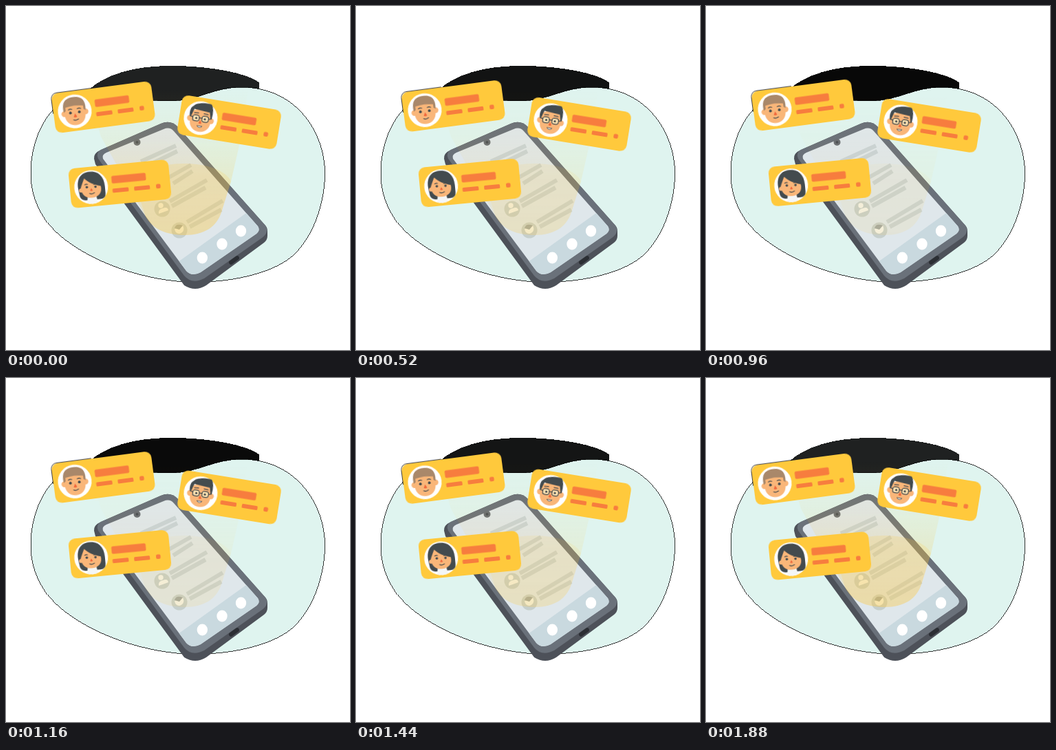
An HTML page for the animation above (1920 ms loop, 500 px wide and 500 px high).

```html
<!DOCTYPE html>
<html lang="en">
<head>
<meta charset="utf-8">
<title>Contact cards over a phone</title>
<style>
html, body { margin: 0; width: 100%; height: 100%; overflow: hidden; background: #fff; }
svg { display: block; width: 100vw; height: 100vh; }

.bob, .beam, .shade { animation: bob 1920ms cubic-bezier(.4, 0, .6, 1) infinite; }
.beam { animation-name: glow; }
.shade { animation-name: dim; }
@keyframes bob { 50% { transform: translateY(var(--rise)); } }
@keyframes glow { 50% { opacity: .28; } }
@keyframes dim { 0%, 100% { fill: #1f2121; } 50% { fill: #080808; } }

.dark { fill: #434b4e; }
.skin { fill: #f9b679; }
.nose { fill: #f0663a; }
.line { fill: none; stroke: #434b4e; stroke-width: 1.2; stroke-linecap: round; }
.rows { stroke: #c9d3d6; stroke-width: 6; }
.crisp { shape-rendering: crispEdges; }
</style>
</head>
<body>
<svg viewBox="0 0 500 500">
  <defs>
    <linearGradient id="ray" gradientUnits="userSpaceOnUse" x1="0" y1="120" x2="0" y2="333">
      <stop offset="0" stop-color="#ffc93c" stop-opacity="0"/>
      <stop offset=".35" stop-color="#ffc93c" stop-opacity=".08"/>
      <stop offset=".6" stop-color="#ffc93c" stop-opacity=".18"/>
      <stop offset="1" stop-color="#ffc93c" stop-opacity=".24"/>
    </linearGradient>
    <clipPath id="glass">
      <path id="screen" d="M141 222Q139 216 146 213L229 179Q238 175 244 182L366 320Q370 326 364 331L283 387Q270 394 262 385Z"/>
    </clipPath>
    <g id="card">
      <rect x="-73" y="-29" width="146" height="58" rx="9.5" fill="#ffc93c"/>
      <g fill="#f77d3e">
        <rect x="-11.5" y="-12.5" width="50" height="11" rx="2"/>
        <rect x="-11.5" y="6" width="23.5" height="6" rx="1.5"/>
        <rect x="20" y="6" width="23" height="6" rx="1.5"/>
        <rect x="52" y="5.5" width="6.5" height="6.5" rx="2"/>
      </g>
      <circle cx="-42" cy=".7" r="24.5" fill="#fff"/>
    </g>
    <g id="head" class="skin">
      <circle cx="-15.5" cy="2" r="4.2"/>
      <circle cx="15.5" cy="2" r="4.2"/>
      <path d="M-15-8Q0-18 15-8V5C15 14 8 20 0 20S-15 14-15 5Z"/>
    </g>
  </defs>

  <!-- backdrop -->
  <path class="shade crisp" d="M121 121C145 100 184 87 240 87C300 87 350 98 368 111V120L300 145H215Z"/>
  <path class="crisp" fill="#dff4ef" stroke="#000" stroke-width=".8"
    d="M36 243C36 203 51 163 80 140C105 121 130 119 160 129C187 136 215 138 240 138C278 138 302 118 342 118C422 118 463.500 184 463.500 243C463.500 288 446 335 419 361C393 386 335 401.500 272 401.500C204 400 126 374 79 334C51 310 36 279 36 243Z"/>

  <!-- phone -->
  <path fill="#4d5159" d="M128 222Q127 214 138 209L225 171Q239 165 249 175L377 319Q380 322 380 328V334Q380 340 375 344L291 406Q275 416 259 406L130 230Z"/>
  <path fill="#6a717a" d="M134 222Q130 213 138 209L225 171Q239 165 249 175L377 319Q383 329 372 337L288 396Q270 405 259 392Z"/>
  <use href="#screen" fill="#dfe7eb"/>
  <g clip-path="url(#glass)">
    <path fill="#c9d9df" d="M246 375L349 301L385 326L270 400Z"/>
    <path class="rows" d="M196 226L247 203M206 232L249 211M237 249L269 231M243 258L271 240M238 284L292 253M241 291L290 264M263 314L315 283M267 321L313 296"/>
    <g fill="#c6cfcc">
      <circle cx="227" cy="295" r="11.5"/>
      <circle cx="252" cy="326" r="11.5"/>
    </g>
    <g fill="#f3f3eb">
      <circle cx="225" cy="290" r="3.7"/>
      <path d="M222 302Q221 295 228 294Q235 291 236 297Z"/>
      <path d="M245 324L257 319Q261 328 252 331Q246 331 245 324Z"/>
    </g>
    <path fill="#a1a7a3" d="M245 323Q247 315 257 319L252 325Z"/>
  </g>
  <circle cx="190.500" cy="198" r="5" fill="#696e74"/>
  <circle cx="190.500" cy="198" r="2" fill="#4a4f55"/>
  <g fill="#fff">
    <ellipse cx="285.300" cy="366" rx="7.700" ry="8.500"/>
    <ellipse cx="314" cy="346" rx="7.700" ry="8.500"/>
    <ellipse cx="341.500" cy="327" rx="7.700" ry="8.500"/>
  </g>
  <rect x="-8.500" y="-3" width="17" height="6" rx="3" fill="#2b2e33" transform="translate(331.500 369.500) rotate(-36)"/>

  <g class="beam">
    <path fill="url(#ray)" d="M118 122H352L338 207L327 255L313 300C306 321 288 333 260 333C232 333 213 324 203 306L138 190Z"/>
    <path fill="#ffc93c" opacity=".18" d="M188 260C195 240 225 229 258 229C292 229 320 239 327 255L313 300C306 321 288 333 260 333C232 333 213 324 203 306Z"/>
  </g>

  <!-- cards -->
  <g class="bob" style="--rise:-3px">
    <g transform="translate(141.500 147) rotate(-7.500)">
      <path d="M-73.500 0V-20Q-73.500-29.600-64-29.600H-14" fill="none" stroke="#111" stroke-width=".8"/>
      <use href="#card"/>
      <g transform="translate(-42 .7)">
        <use href="#head"/>
        <path fill="#a9886a" d="M-16 0C-18-16-11-21 0-21S18-16 16 0L13-2V-7Q0-10-13-7V-2Z"/>
        <circle class="dark" cx="-6.500" cy="1.500" r="2"/>
        <circle class="dark" cx="6.500" cy="1.500" r="2"/>
        <path class="line" d="M-9-3Q-7-5-4-3.500M4-3.500Q7-5 9-3M-3 12Q0 14 4 11.500"/>
        <path class="nose" d="M0 3L2.500 8Q0 9.500-2.500 8Z"/>
      </g>
    </g>
  </g>

  <g class="bob" style="--rise:5px">
    <g transform="translate(324.500 169) rotate(9.200)">
      <use href="#card"/>
      <g transform="translate(-42 .7)">
        <use href="#head"/>
        <path class="dark" d="M-16 0C-18-9-16-14-13-16C-8-22 4-23 13-22Q18-16 16 0L14-2L12-10Q0-11-11-12L-14-2Z"/>
        <g fill="#fbe0b0" stroke="#434b4e" stroke-width="1.200">
          <rect x="-11.500" y="-3.500" width="9.500" height="8.500" rx="3"/>
          <rect x="2" y="-3.500" width="9.500" height="8.500" rx="3"/>
        </g>
        <path class="line" d="M-2 0H2M-15-1L-11.500 0M11.500 0L15-1M-10-6.500L-4-7M4-7L10-6.500"/>
        <circle class="dark" cx="-6.300" cy=".8" r="1.600"/>
        <circle class="dark" cx="6.300" cy=".8" r="1.600"/>
        <path class="nose" d="M0 3L2.300 7.500Q0 9-2.300 7.500Z"/>
        <path fill="#fff" stroke="#434b4e" stroke-width=".8" d="M-4 11.500H4Q0 16-4 11.500Z"/>
      </g>
    </g>
  </g>

  <g class="bob" style="--rise:-2.500px">
    <g transform="translate(165.500 258.500) rotate(-5.500)">
      <use href="#card"/>
      <g transform="translate(-42 1.200)">
        <path class="dark" d="M-19 0C-20-16-12-23 0-23S20-15 20 0V10Q20 18 12 18H-10Q-18 17-18 8Z"/>
        <path fill="#f4f6f6" d="M-6 12H6L8 22Q0 26-8 22Z"/>
        <circle class="skin" cx="-15" cy="3" r="3"/>
        <path class="skin" d="M-15-1C-13-6-11-10-9-14C-3-7 6-3 14-1C16 8 10 15 0 15S-15 9-15-1Z"/>
        <circle class="dark" cx="-6.300" cy="-1" r="1.800"/>
        <circle class="dark" cx="6.300" cy="-.5" r="1.800"/>
        <path class="line" d="M-9-4.500Q-7-6-5-5M4-4Q7-5 9-3.500M-3 8.500Q0 10.500 4 8"/>
        <path class="nose" d="M0 1L2 4.500Q0 6-2 4.500Z"/>
      </g>
    </g>
  </g>
</svg>
</body>
</html>
```
